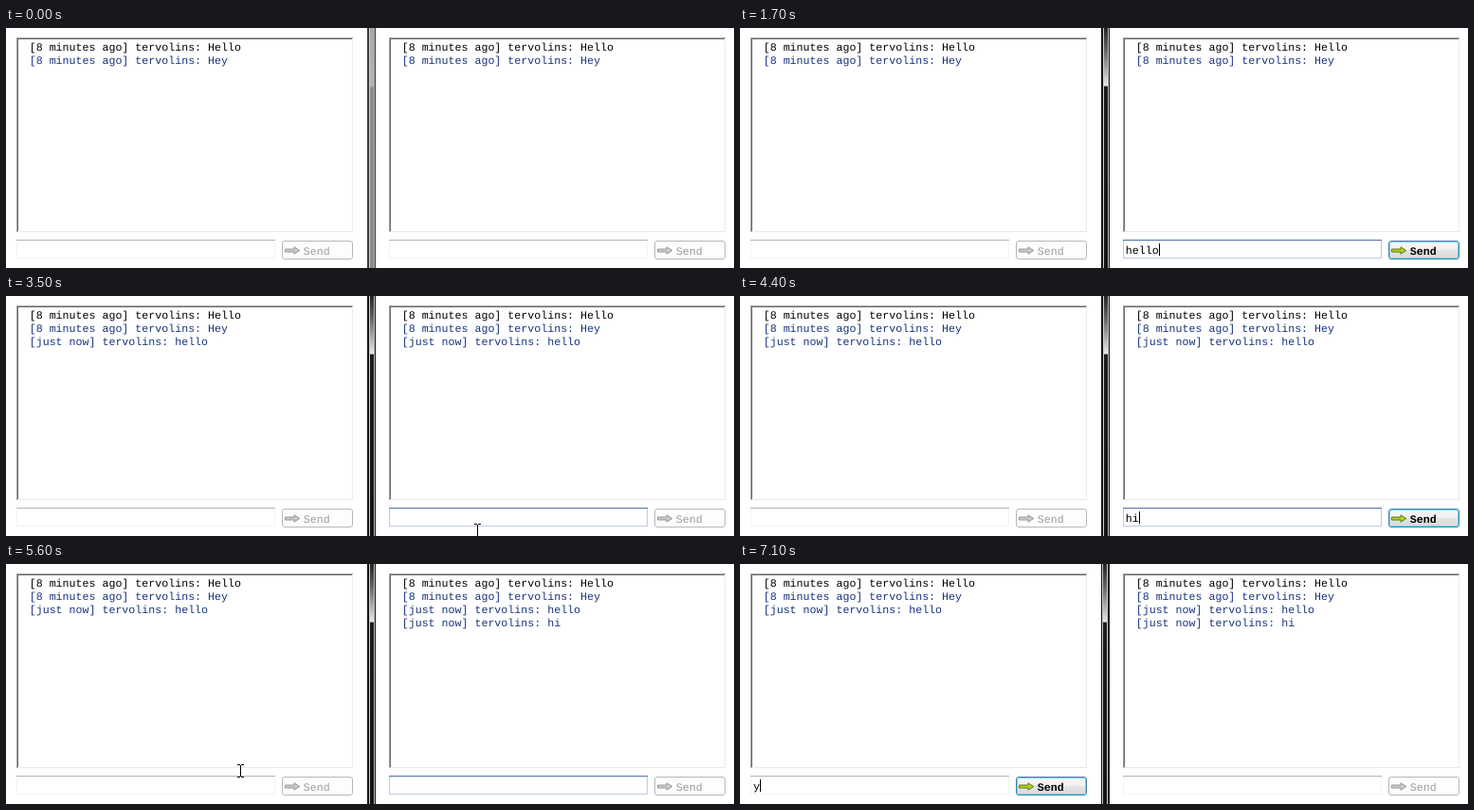
An HTML page with a canvas that plays this animation: 768 px wide and 254 px high, repeating every 7200 ms.

```html
<!DOCTYPE html>
<html lang="en">
<head>
<meta charset="utf-8">
<title>Chat windows</title>
<style>
html, body { margin: 0; width: 768px; height: 254px; overflow: hidden; background: #fff; }
canvas { display: block; }
</style>
</head>
<body>
<canvas id="stage" width="768" height="254"></canvas>
<script>
const ctx = document.getElementById('stage').getContext('2d');
const LOOP = 7200, RIGHT = 393, STEP = 100;
const FONT = '11.64px "Liberation Mono", "Courier New", monospace';
const BLACK = '#000', NAVY = '#17347c';
const USER = 'tervolins';

const first = `[8 minutes ago] ${USER}: Hello`;
const second = `[8 minutes ago] ${USER}: Hey`;
const said = word => `[just now] ${USER}: ${word}`;
const base = [first, second];
const withHello = [...base, said('hello')];
const withHi = [...withHello, said('hi')];

// Each track is a list of [start time, value]; values hold until the next entry.
const tracks = {
  leftLog: [[0, base], [2300, ['[']], [2400, withHello], [4100, ['[']], [4200, withHello]],
  rightLog: [[0, base], [2100, [first, '[']], [2200, withHello], [4900, ['[']], [5000, withHi]],
  leftText: [[0, ''], [7100, 'y']],
  rightText: [[0, ''], [1000, 'h'], [1100, 'he'], [1400, 'hel'], [1500, 'hell'], [1700, 'hello'],
    [1900, ''], [4200, 'h'], [4400, 'hi'], [4800, '']],
  leftCaret: [[0, false], [6100, true], [6500, false], [6800, true]],
  rightCaret: [[0, false], [200, true], [600, false], [1000, true], [1900, false], [2200, true],
    [2600, false], [3000, true], [3500, false], [4000, true], [4800, false], [5000, true], [5500, false]],
  rightFocus: [[0, 0], [200, 1], [1900, 0], [2200, 1], [4800, 0], [5000, 1]],
  activeWindow: [[0, 'none'], [100, 'right'], [6000, 'left']],
  pointer: [[0, null], [100, [108, 236]], [200, [470, 238]], [300, null],
    [3300, [496, 252]], [3400, [497, 249]], [3500, [497, 247]], [4000, null],
    [5200, [691, 244, 'arrow']], [5400, [560, 240]], [5500, [400, 228]], [5600, [247, 218]],
    [5700, [206, 226]], [5800, [176, 234]], [5900, [168, 237]], [6100, null]]
};

function at(name, t) {
  let value;
  for (const [start, v] of tracks[name]) if (t >= start) value = v;
  return value;
}

function rect(x, y, w, h, color) {
  ctx.fillStyle = color;
  ctx.fillRect(x, y, w, h);
}

function gradient(y0, y1, stops) {
  const g = ctx.createLinearGradient(0, y0, 0, y1);
  for (const [pos, color] of stops) g.addColorStop(pos, color);
  return g;
}

function mix(a, b, k) {
  return `rgb(${a.map((v, i) => Math.round(v + (b[i] - v) * k)).join()})`;
}

function text(str, x, y, color, weight = '') {
  ctx.font = `${weight} ${FONT}`;
  ctx.fillStyle = color;
  ctx.fillText(str, x, y);
}

function drawLog(lines) {
  rect(11, 10, 355, 1, '#a8a8a8');
  rect(11, 11, 355, 1, '#696969');
  rect(11, 10, 1, 206, '#a0a0a0');
  rect(12, 11, 1, 204, '#696969');
  rect(365, 11, 1, 205, '#ececec');
  rect(12, 215, 354, 1, '#e8e8e8');
  lines.forEach((line, i) => {
    const dark = i === 0 || line === '[';
    text(line, 24.7, 24.2 + 14 * i, dark ? BLACK : NAVY);
  });
}

function drawInput(value, caret, focus, textX) {
  const side = mix([243, 243, 244], [190, 202, 226], focus);
  rect(11, 224, 273, 20, side);
  rect(12, 225, 271, 18, '#fff');
  rect(11, 224, 273, 1, mix([178, 179, 182], [82, 112, 168], focus));
  text(value, textX, 239, '#000');
  if (caret) rect(Math.round(textX + ctx.measureText(value).width + 0.3), 228, 1, 13, '#000');
}

function drawArrow(on) {
  ctx.beginPath();
  [[294.5, 234], [304, 234], [304, 231.8], [309.8, 235.5],
    [304, 239.2], [304, 237], [294.5, 237]].forEach(p => ctx.lineTo(...p));
  ctx.closePath();
  ctx.fillStyle = on ? '#b2d21c' : '#cacaca';
  ctx.strokeStyle = on ? '#5f7a18' : '#989898';
  ctx.lineWidth = 1;
  ctx.fill();
  ctx.stroke();
}

function roundBox(inset, color, fill) {
  ctx.beginPath();
  ctx.roundRect(291.5 + inset, 225.5 + inset, 74 - 2 * inset, 19 - 2 * inset, 2.5 - inset);
  if (fill) {
    ctx.fillStyle = fill;
    ctx.fill();
  }
  ctx.strokeStyle = color;
  ctx.lineWidth = 1;
  ctx.stroke();
}

function drawButton(on) {
  if (on) {
    roundBox(0, '#3b84a6', gradient(226, 244,
      [[0, '#f8f8f8'], [0.5, '#f0f0f0'], [0.51, '#e4e4e4'], [1, '#d8dada']]));
    roundBox(1, '#74d3ee');
  } else {
    roundBox(0, '#b6b7b8', '#fdfdfd');
  }
  drawArrow(on);
  text('Send', 313.8, 239.5, on ? '#000' : '#9c9c9c', on ? 'bold' : '');
}

function drawPane(dx, log, value, caret, focus, textX) {
  ctx.save();
  ctx.translate(dx, 0);
  drawLog(log);
  drawInput(value, caret, focus, textX);
  drawButton(value !== '');
  ctx.restore();
}

// The two window edges meet here; the strip is mirrored when the left window is active.
function drawDivider(active) {
  const on = active !== 'none';
  const edge = on ? '#151515' : '#3a3a3a';
  const body = on
    ? [[0, '#242424'], [0.09, '#606060'], [0.24, '#e6e6e6'], [0.245, '#1c1c1c'], [1, '#141414']]
    : [[0, '#a6a6a6'], [0.24, '#b4b4b4'], [0.25, '#8c8c8c'], [1, '#8a8a8a']];
  ctx.save();
  if (active === 'left') {
    ctx.translate(771, 0);
    ctx.scale(-1, 1);
  }
  rect(381, 0, 2, 254, edge);
  rect(383, 0, 1, 254, '#cfcfcf');
  rect(384, 0, 4, 254, gradient(0, 254, body));
  rect(388, 0, 1, 254, on ? '#c4c4c4' : '#b0b0b0');
  rect(389, 0, 1, 254, edge);
  ctx.restore();
}

function drawPointer([x, y, kind]) {
  if (kind === 'arrow') {
    ctx.beginPath();
    [[0, 0], [0, 15], [4, 11.5], [6.5, 17], [9, 16], [6.5, 10.5], [11, 10.5]]
      .forEach(([px, py]) => ctx.lineTo(x + px, y + py));
    ctx.closePath();
    ctx.fillStyle = '#fff';
    ctx.strokeStyle = '#000';
    ctx.lineWidth = 1;
    ctx.fill();
    ctx.stroke();
    return;
  }
  rect(x, y - 5, 1, 12, '#000');
  for (const row of [y - 6, y + 7]) {
    rect(x - 3, row, 3, 1, '#000');
    rect(x + 1, row, 3, 1, '#000');
  }
}

function draw(now) {
  const t = Math.floor((now % LOOP) / STEP) * STEP;
  rect(0, 0, 768, 254, '#fff');
  ctx.textRendering = 'geometricPrecision';
  const fade = 1 - Math.min(1, Math.max(0, (t - 6100) / 700));
  drawPane(0, at('leftLog', t), at('leftText', t), at('leftCaret', t), 0, 14);
  drawPane(RIGHT, at('rightLog', t), at('rightText', t), at('rightCaret', t),
    at('rightFocus', t) * fade, 13.8);
  drawDivider(at('activeWindow', t));
  const pointer = at('pointer', t);
  if (pointer) drawPointer(pointer);
}

const begin = performance.now();
function loop() {
  draw(performance.now() - begin);
  requestAnimationFrame(loop);
}
loop();
</script>
</body>
</html>
```
